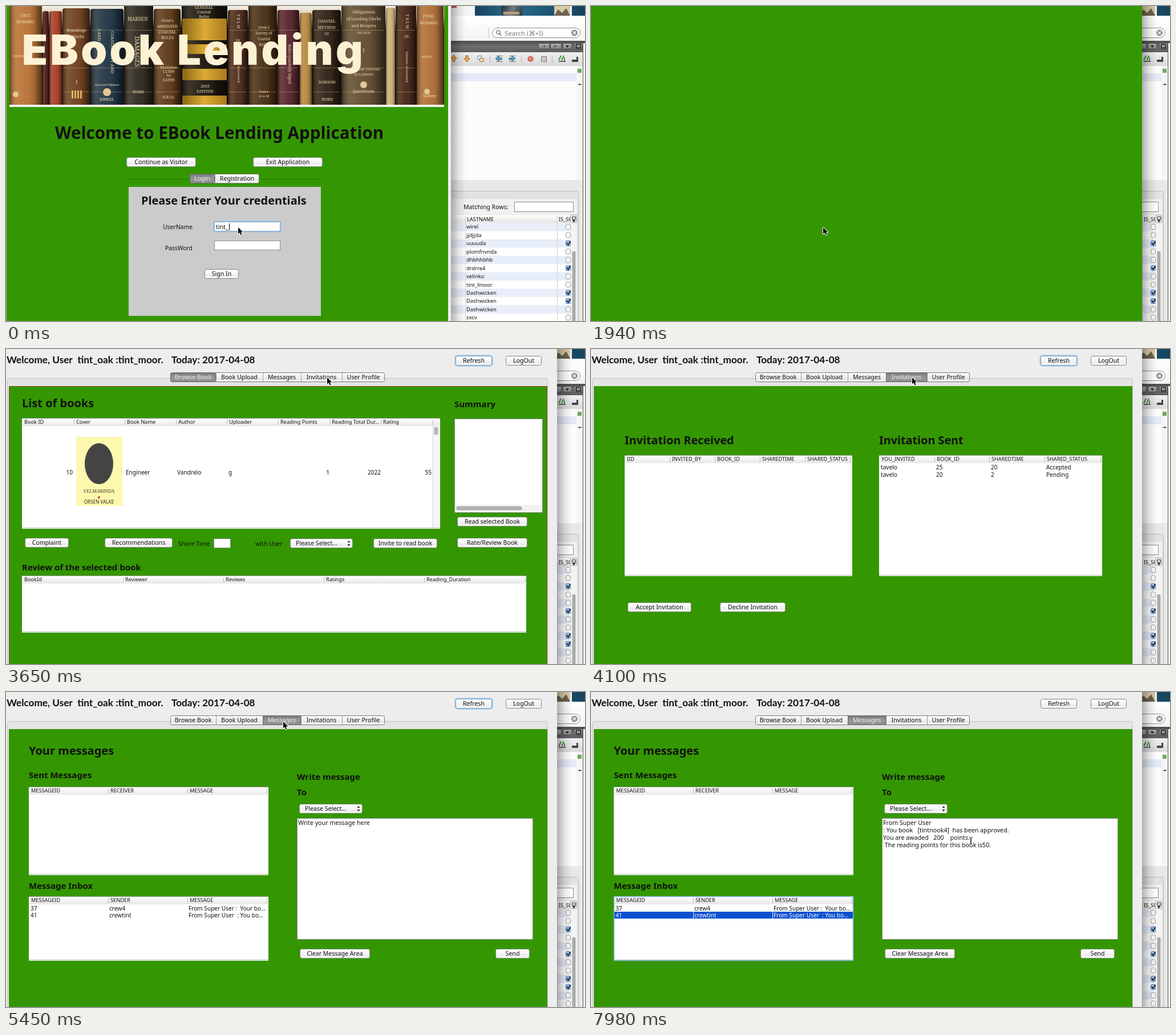
Write an HTML page with a canvas that moves like this. It is 1015 px wide and 552 px high and loops after 8000 ms.

```html
<!DOCTYPE html>
<html lang="en">
<head>
<meta charset="utf-8">
<title>EBook Lending</title>
<style>
html, body { margin: 0; width: 100%; height: 100%; overflow: hidden; background: #349702; }
canvas { display: block; }
</style>
</head>
<body>
<canvas id="stage" width="1015" height="552"></canvas>
<script>
const g = document.getElementById('stage').getContext('2d');
const LOOP = 8000, GREEN = '#349702', INK = '#111';
const SANS = '"Noto Sans", "Open Sans", sans-serif';

// ---------- helpers ----------
function rect(x, y, w, h, fill) { g.fillStyle = fill; g.fillRect(x, y, w, h); }

function fade(x0, y0, x1, y1, ...colors) {
  const gr = g.createLinearGradient(x0, y0, x1, y1);
  colors.forEach((c, i) => gr.addColorStop(i / (colors.length - 1), c));
  return gr;
}

function round(x, y, w, h, r, fill, stroke, lw = 1) {
  g.beginPath();
  g.roundRect(x + .5, y + .5, w - 1, h - 1, r);
  if (fill) { g.fillStyle = fill; g.fill(); }
  if (stroke) { g.strokeStyle = stroke; g.lineWidth = lw; g.stroke(); }
}

function disc(x, y, r, fill) {
  g.beginPath(); g.arc(x, y, r, 0, 7); g.fillStyle = fill; g.fill();
}

function poly(points, fill, stroke, lw = 1) {
  g.beginPath();
  for (let i = 0; i < points.length; i += 2) g.lineTo(points[i], points[i + 1]);
  if (fill) { g.closePath(); g.fillStyle = fill; g.fill(); }
  if (stroke) { g.strokeStyle = stroke; g.lineWidth = lw; g.stroke(); }
}

// y is the middle of the capitals
function text(s, x, y, size = 10.6, o = {}) {
  g.font = `${o.weight || 400} ${size}px ${o.font || SANS}`;
  g.textAlign = o.align || 'left';
  g.fillStyle = o.color || INK;
  g.fillText(s, x, y + size * .357);
}

const heading = (s, x, y, size = 15) => text(s, x, y, size, { weight: 700 });

function focusRing(x, y, w, h, r) {
  round(x - 1, y - 1, w + 2, h + 2, r + 1, null, '#92c2ee', 2);
}

function button(s, x, y, w, h = 17, focus) {
  round(x, y, w, h, 3, fade(0, y, 0, y + h, '#fff', '#fbfbfb', '#ececec', '#fafafa'), '#7d8a76');
  if (focus) focusRing(x, y, w, h, 3);
  text(s, x + w / 2, y + h / 2, 10.6, { align: 'center' });
}

function field(x, y, w, h, focus) {
  rect(x, y, w, h, '#fff');
  g.lineWidth = 1; g.strokeStyle = '#8c8c8c';
  g.strokeRect(x + .5, y + .5, w - 1, h - 1);
  if (focus) focusRing(x, y, w, h, 1);
}

function popup(x, y, w) {
  button('', x, y, w);
  text('Please Select...', x + 10, y + 8.5);
  const cx = x + w - 7;
  poly([cx - 2.5, y + 7, cx + 2.5, y + 7, cx, y + 3.5], '#333');
  poly([cx - 2.5, y + 10, cx + 2.5, y + 10, cx, y + 13.5], '#333');
}

function segments(labels, edges, y, active) {
  const x = edges[0], w = edges.at(-1) - x, h = 17;
  round(x, y, w, h, 3, fade(0, y, 0, y + h, '#fff', '#f4f4f4', '#e8e8e8', '#fafafa'), '#777');
  labels.forEach((s, i) => {
    const a = edges[i], b = edges[i + 1];
    if (i === active) round(a, y, b - a, h, i ? 0 : 3, fade(0, y, 0, y + h, '#777', '#969696', '#8a8a8a'), '#666');
    else if (i) rect(a, y + 1, 1, h - 2, '#9a9a9a');
    text(s, (a + b) / 2, y + 8.5, 10.6, { align: 'center', color: i === active ? '#eee' : INK });
  });
}

function table(x, y, w, h, heads, edges) {
  rect(x, y, w, h, '#fff');
  rect(x, y, w, 1, '#9b9b9b');
  rect(x, y + h - 2, w, 1, '#aebaa6');
  rect(x + 1, y + 1, w - 2, 13, fade(0, y, 0, y + 14, '#fff', '#f5f5f5', '#e6e6e6'));
  heads.forEach((s, i) => {
    text(s, edges[i] + 4, y + 7, 9.2);
    rect(edges[i + 1], y + 3, 1, 9, '#b5b5b5');
  });
}

function cells(row, xs, y, color) {
  row.forEach((s, i) => text(s, xs[i], y, 10.1, { color }));
}

// ---------- window behind ----------
const PEOPLE = ['wirel', 'jjdjjda', 'uuuuda', 'plomfnvnda', 'dhbhhbhb', 'drdrre4', 'velinko',
  'tint_lmoor', 'Dashwicken', 'Dashwicken', 'Dashwicken', 'zxcv'];
const TICKED = [2, 5, 8, 9];

function ide() {
  rect(775, 0, 240, 552, '#e8e8e8');
  // picture strip
  rect(775, 0, 47, 17, '#f4f4f4');
  rect(781, 0, 9, 3, '#c8453a');
  rect(822, 0, 193, 17, fade(822, 0, 1015, 0, '#17435c', '#2b6d8c', '#1d5674', '#17435c'));
  rect(868, 0, 37, 17, fade(868, 0, 905, 17, '#1c2b36', '#6d7d82', '#27323a'));
  rect(872, 10, 28, 5, '#b39a76');
  rect(961, 0, 28, 17, '#d8c9a8');
  poly([961, 17, 968, 6, 975, 12, 982, 4, 989, 17], '#6b6350');
  rect(989, 0, 3, 17, '#f4f4f4');
  rect(775, 17, 240, 45, fade(0, 17, 0, 62, '#fff', '#f4f4f4'));
  // search
  rect(846, 38, 1, 19, '#c4c4c4');
  round(852, 38, 155, 18, 9, '#fff', '#8f8f8f');
  g.beginPath(); g.arc(863, 46, 3.2, 0, 7); g.strokeStyle = '#666'; g.lineWidth = 1.2; g.stroke();
  poly([865, 48.5, 868, 52], null, '#666', 1.4);
  text('Search (⌘+I)', 874, 47.5, 11.4, { color: '#777' });
  disc(996.5, 47, 5.5, '#8e8e8e');
  poly([994, 44.5, 999, 49.5], null, '#fff', 1.4);
  poly([999, 44.5, 994, 49.5], null, '#fff', 1.4);
  // dark bar
  rect(775, 61, 240, 20, fade(0, 61, 0, 81, '#4c4c4c', '#6e6e6e', '#5d5d5d'));
  [[933, 20], [954, 20], [976, 16], [996, 15]].forEach(([x, w]) =>
    round(x, 65, w, 11, 1, fade(0, 65, 0, 76, '#b4b4b4', '#7c7c7c'), '#474747'));
  poly([941, 70.5, 945, 68, 945, 73], '#555');
  poly([965, 70.5, 961, 68, 961, 73], '#555');
  poly([981, 69, 987, 69, 984, 73], '#222');
  g.strokeStyle = '#111'; g.lineWidth = 1.4; g.strokeRect(999.5, 67.5, 8, 6);
  // tools
  rect(775, 81, 240, 24, fade(0, 81, 0, 105, '#f0f0f0', '#d9d9d9'));
  const arrow = (x, d) => poly([x - 5, 92, x, 92 - 6 * d, x + 5, 92, x + 2, 92, x + 2, 92 + 5 * d, x - 2, 92 + 5 * d, x - 2, 92], '#f0a848', '#8b5c20');
  arrow(785, 1); arrow(808, -1);
  round(826, 87, 8, 7, 1, '#e6eefa', '#4a78a8');
  round(830, 91, 8, 7, 1, '#f4d9a0', '#8b7740');
  [[864, -1], [887, 1]].forEach(([x, d]) => {
    for (const y of [87, 97]) rect(x - 5, y, 12, 1, '#777');
    poly([x + 6 * d, 92, x, 88, x, 91, x - 5 * d, 91, x - 5 * d, 94, x, 94, x, 97], '#5aa0c8', '#276184');
  });
  for (const x of [848, 903, 957]) rect(x, 86, 1, 14, '#b2b2b2');
  disc(919.5, 92.5, 5, '#c84b3f'); disc(919.5, 92, 3.6, '#e8877b');
  round(938, 88, 10, 10, 0, '#c9c9c9', '#777');
  rect(969, 96, 12, 2, '#666'); rect(978, 90, 2, 7, '#777');
  poly([969, 95, 973, 87], null, '#35942f', 2);
  poly([974, 95, 978, 87], null, '#35942f', 2);
  rect(992, 94, 11, 4, '#444'); rect(1000, 89, 3, 6, '#444');
  // editor
  rect(775, 105, 236, 200, '#fcfcfc');
  rect(775, 118, 225, 14, '#e3e9f6');
  rect(1000, 105, 11, 200, '#f5f5f5');
  rect(1002, 110, 7, 7, '#67ad58');
  rect(1002, 137, 7, 1, '#555'); rect(1005, 136, 2, 3, '#555');
  // results
  round(760, 324, 244, 260, 3, '#e2e2e2', '#bababa');
  rect(775, 338, 226, 27, '#f1f1f1');
  text('Matching Rows:', 802, 352);
  field(891, 343, 104, 18);
  rect(775, 366, 226, 14, fade(0, 366, 0, 380, '#fff', '#e6e6e6'));
  text('LASTNAME', 808, 373.5, 9.2);
  text('IS_SU', 969, 373.5, 9.2);
  PEOPLE.forEach((name, i) => {
    const y = 380 + i * 14.45;
    rect(775, y, 216, 14.5, i % 2 ? '#fff' : '#e8eef9');
    text(name, 807, y + 7, 9.4);
    const on = TICKED.includes(i);
    round(981, y + 2, 9, 10, 2, on ? '#9fc8f2' : '#fafafa', on ? '#4672a8' : '#9a9a9a');
    if (on) poly([983, y + 6, 985.5, y + 9.5, 989.5, y + 3], null, '#111', 1.7);
  });
  for (const x of [805, 966]) rect(x, 367, 1, 185, '#cfcfcf');
  rect(990, 380, 11, 172, '#f3f3f3');
  round(992, 429, 7, 140, 3.5, '#aaa');
  round(989, 366, 12, 14, 1, '#f6f6f6', '#999');
  g.strokeStyle = '#222'; g.strokeRect(992.5, 369.5, 6, 4);
  poly([992, 375, 999, 375, 995.5, 379], '#222');
  rect(1011, 65, 1, 487, '#555');
  rect(1012, 65, 3, 487, '#f5f5f5');
}

function shadow(x) {
  rect(x, 0, 26, 552, fade(x, 0, x + 26, 0, 'rgba(0,0,0,.3)', 'rgba(0,0,0,.1)', 'rgba(0,0,0,0)'));
}

// ---------- login ----------
// left, width, colour, top
const SPINES = [
  [6, 58, '#b8743a', 0], [64, 12, '#4b1f1a', 9], [76, 23, '#a8402c', 9], [99, 49, '#6e4021', 4],
  [148, 59, '#203546', 5], [207, 52, '#2e2a23', 0], [259, 48, '#5e3a1c', 5], [308, 81, '#1c1610', 0],
  [389, 36, '#4b2b1b', 7], [425, 51, '#493019', 0], [476, 39, '#572530', 7], [515, 22, '#b78a44', 12],
  [537, 51, '#2e2117', 7], [588, 78, '#614d34', 0], [666, 17, '#cdb27c', 3], [683, 37, '#47261a', 0],
  [720, 48, '#b0703a', 0]
];

function lines(list, x, y, size, step = size * 1.25) {
  list.forEach((s, i) => text(s, x, y + i * step, size,
    { align: 'center', color: '#f0dfb5', font: '"Noto Serif", serif' }));
}

function upright(s, x, y, size) {
  g.save(); g.translate(x, y); g.rotate(Math.PI / 2);
  lines([s], 0, 0, size);
  g.restore();
}

function banner() {
  rect(6, 0, 762, 176, fade(0, 0, 0, 40, '#f6f1e6', '#cbbfa8', '#1c130d'));
  SPINES.forEach(([x, w, c, top], i) => {
    g.beginPath();
    g.roundRect(x, top, w - 1, 173 - top, top ? [4, 4, 0, 0] : 0);
    for (const fill of [c, fade(x, 0, x + w, 0, 'rgba(0,0,0,.45)', 'rgba(255,235,190,.12)',
      'rgba(255,235,190,.04)', 'rgba(0,0,0,.12)', 'rgba(0,0,0,.6)')]) {
      g.fillStyle = fill; g.fill();
    }
    if (w > 30 && i && i !== 7 && i < 16)
      for (const y of [42, 108, 150]) rect(x + 2, y, w - 5, 1, 'rgba(235,205,140,.35)');
  });
  for (const [y, h] of [[22, 38], [67, 17], [110, 20], [157, 16]])
    rect(309, y, 78, h, fade(309, 0, 387, 0, '#8a6517', '#dcab35', '#a87a1d'));
  rect(6, 173, 762, 4, '#f3f1e6');

  lines(['FIRST', 'REMARKS'], 34, 17, 6.5, 11);
  lines(['ORVEN'], 22, 88, 6);
  lines(['Brandings', '& Marks'], 123, 43, 7, 11);
  lines(['1'], 124, 134, 8);
  for (let i = 0; i < 4; i++) rect(115 + i * 5, 148, 3, 14, '#d9b25c');
  upright('COASTAL DUTY AND', 187, 81, 7.5);
  upright('LAND CLAIMS', 164, 66, 7.5);
  lines(['Second Edition'], 177, 138, 6);
  lines(['BIRKEL'], 177, 164, 7);
  lines(['MARDEN'], 231, 23, 8);
  upright('DAMAGES', 230, 80, 11);
  lines(['NORD'], 232, 151, 7);
  lines(["Orne's", 'ABRIDGED', 'COASTAL', 'RULES'], 283, 26, 7, 10);
  lines(['Sections', '12300', 'to', '14599'], 285, 107, 7.5, 7.3);
  lines(['N.R.Co.'], 285, 160, 6.5);
  lines(['GENERAL', 'Coastal', 'Rules'], 347, 3, 7, 8);
  lines(['2005', 'EDITION'], 349, 141, 7, 9);
  upright('T R L M', 407, 27, 7);
  lines(['28'], 406, 61, 7);
  upright('Statutes Annotated', 408, 107, 6);
  lines(["Orne's", 'Survey of', 'Coastal', 'Rules'], 452, 38, 6.5, 10);
  lines(['Index', 'A to M'], 452, 150, 6, 8);
  upright('Rules Quarterly Digest', 497, 102, 6.5);
  lines(['COASTAL', 'METHOD', '10'], 562, 27, 7, 11);
  lines(['DORWIN'], 563, 134, 7);
  lines(['NORD'], 563, 164, 7);
  lines(['Obligations', 'of Lending Clerks', 'and Keepers'], 627, 10, 7.3, 12);
  lines(['VELDEN'], 627, 47, 6);
  lines(['1'], 627, 78, 8);
  lines(['RULES AND CUSTOMS', 'OF LENDING'], 627, 111, 5.5, 9);
  lines(['QuireNorm'], 627, 150, 7);
  upright('T R L M', 703, 27, 7);
  lines(['29'], 702, 54, 7);
  upright('Statutes Annotated', 703, 107, 6);
  lines(['FINAL', 'REMARKS'], 741, 18, 6.5, 12);
  lines(['ROWE'], 738, 89, 6);
  lines(['Tolliver'], 743, 158, 6.5);
  for (const [x, y, r] of [[17, 155, 5], [177, 151, 7], [627, 138, 6], [738, 150, 5]]) disc(x, y, r, '#e2c795');

  g.letterSpacing = '4.5px';
  text('EBook Lending', 28, 76.5, 73.5, { weight: 900, font: 'Inter, "Open Sans", sans-serif', color: '#fdf1d3' });
  g.letterSpacing = '0px';
}

function login(t) {
  rect(0, 0, 775, 552, GREEN);
  rect(0, 0, 1, 552, '#9fc78c');
  rect(775, 0, 5, 552, '#ededed');
  shadow(780);
  banner();
  heading('Welcome to EBook Lending Application', 86, 222, 29.6);
  button('Continue as Visitor', 211, 265, 122);
  button('Exit Application', 433, 265, 122);
  rect(215, 303, 338, 1, '#2a7a05');
  segments(['Login', 'Registration'], [322, 366, 444], 294, 0);
  rect(215, 317, 337, 226, '#cbcbcb');
  heading('Please Enter Your credentials', 237, 341, 19.9);
  text('UserName', 327, 387, 10.4, { align: 'right' });
  text('PassWord', 327, 424, 10.4, { align: 'right' });

  const inName = t < 750;
  const step = (from) => Math.max(0, Math.min(3, Math.floor((t - from) / 150) + 1));
  const name = 'tint_oak'.slice(0, 5 + step(150));
  field(365, 378, 116, 17, inName);
  field(365, 411, 116, 17, !inName);
  text(name, 368, 387);
  let caret = 369 + g.measureText(name).width;
  if (!inName) {
    const dots = step(1200);
    for (let i = 0; i < dots; i++) disc(371.5 + i * 6.5, 420, 2.5, INK);
    caret = 368 + dots * 6.6;
  }
  rect(Math.round(caret), inName ? 381 : 413, 1, 12, '#000');
  button('Sign In', 348, 461, 60);
}

// ---------- main window ----------
const TABS = ['Browse Book', 'Book Upload', 'Messages', 'Invitations', 'User Profile'];

function frame(tab, refreshFocus) {
  rect(0, 0, 966, 552, '#ededed');
  const o = { weight: 700, font: 'Lato, sans-serif' };
  text('Welcome, User  tint_oak :tint_moor.', 1, 19, 17.2, o);
  text('Today: 2017-04-08', 290, 19, 17.2, o);
  button('Refresh', 788, 12, 64, 17, refreshFocus);
  button('LogOut', 876, 12, 63);
  round(2, 51, 948, 520, 4, '#e4e4e4', '#c2c2c2');
  segments(TABS, [288, 368, 450, 517, 589, 664], 41, tab);
  rect(5, 65, 944, 487, GREEN);
}

function cover() {
  rect(123, 154, 81, 121, '#fdf8ae');
  g.beginPath(); g.ellipse(163, 201, 25, 36, 0, 0, 7);
  g.fillStyle = '#444'; g.fill();
  text('VELMARINDA', 163, 249, 8.2, { align: 'center', font: '"Liberation Serif", serif', color: '#332a1c' });
  disc(163, 260, 2, '#b5402a');
  text('ORSEN VALKE', 163, 268.5, 8.2, { align: 'center', color: '#332a1c' });
}

function browse(ready) {
  frame(0, ready);
  g.strokeStyle = '#8f4a12'; g.lineWidth = 1;
  g.strokeRect(5.5, 65.5, 943, 500);
  heading('List of books', 28, 95, 20);
  heading('Summary', 786, 97);
  table(28, 121, 733, 194,
    ['Book ID', 'Cover', 'Book Name', 'Author', 'Uploader', 'Reading Points', 'Reading Total Dur...', 'Rating'],
    [28, 119, 208, 298, 387, 477, 567, 657, 748]);
  rect(748, 135, 1, 178, '#d0d0d0');
  rect(749, 135, 11, 178, '#f6f6f6');
  round(750, 136, 8, 15, 4, '#b5b5b5');
  cover();
  cells(['Engineer', 'Vandrelo', 'g'], [210, 300, 390], 216);
  [['10', 117], ['1', 567], ['2022', 657], ['55', 746]].forEach(([s, x]) =>
    text(s, x, 216, 10.1, { align: 'right' }));
  field(786, 122, 155, 165);
  rect(787, 273, 153, 12, '#f2f2f2');
  round(789, 275, 116, 8, 4, '#b0b0b0');
  button('Read selected Book', 791, 294, 123);
  button('Rate/Review Book', 791, 331, 123);
  button('Complaint', 33, 331, 77);
  button('Recommendations', 173, 331, 119);
  text('Share Time', 302, 341);
  field(364, 332, 30, 17);
  text('with User', 437, 341);
  popup(498, 332, 110);
  button('Invite to read book', 644, 332, 112);
  heading('Review of the selected book', 28, 383);
  table(28, 397, 884, 100, ['BookId', 'Reviewer', 'Reviews', 'Ratings', 'Reading_Duration'],
    [28, 205, 381, 557, 733, 910]);
}

function invitations() {
  frame(3, true);
  heading('Invitation Received', 59, 160, 19.8);
  heading('Invitation Sent', 505, 160, 19.8);
  table(59, 186, 399, 212, ['IID', 'INVITED_BY', 'BOOK_ID', 'SHAREDTIME', 'SHARED_STATUS'],
    [59, 138, 217, 296, 375, 454]);
  table(505, 186, 391, 212, ['YOU_INVITED', 'BOOK_ID', 'SHAREDTIME', 'SHARED_STATUS'],
    [505, 602, 698, 795, 893]);
  const xs = [508, 605, 701, 798];
  cells(['tavelo', '25', '20', 'Accepted'], xs, 207);
  cells(['tavelo', '20', '2', 'Pending'], xs, 220);
  button('Accept Invitation', 64, 444, 112);
  button('Decline Invitation', 226, 444, 115);
}

function messages(open) {
  frame(2, !open);
  heading('Your messages', 40, 103, 20);
  heading('Sent Messages', 40, 146);
  heading('Message Inbox', 40, 340);
  heading('Write message', 510, 149);
  heading('To', 510, 176);
  const edges = [40, 179, 318, 457];
  table(40, 166, 420, 155, ['MESSAGEID', 'RECEIVER', 'MESSAGE'], edges);
  table(40, 358, 420, 113, ['MESSAGEID', 'SENDER', 'MESSAGE'], edges);
  if (open) {
    round(40, 358, 420, 113, 0, null, '#8dbbe8', 1.5);
    rect(41, 385, 418, 12, '#0b50d0');
    for (const x of [179, 318]) rect(x, 385, 1, 12, '#dfe8f8');
  }
  const xs = [43, 181, 320];
  cells(['37', 'crew4', 'From Super User :  Your bo...'], xs, 379);
  cells(['41', 'crewtint', 'From Super User  : You bo...'], xs, 391.5, open ? '#fff' : INK);
  popup(514, 196, 111);
  field(510, 221, 414, 213);
  const body = open
    ? ['From Super User', ': You book   [tintnook4]  has been approved.',
       'You are awaded   200    points.', ' The reading points for this book is50.']
    : ['Write your message here'];
  body.forEach((s, i) => text(s, 512, 229.5 + i * 12.8, 10.7));
  button('Clear Message Area', 515, 450, 123);
  button('Send', 858, 450, 60);
}

// ---------- pointer ----------
// start time, step length, then the points visited
const PATHS = [
  [0, 1, [[407, 388]]],
  [2560, 156, [[416, 366], [452, 296], [520, 200], [592, 118], [629, 74], [598, 58], [563, 53]]],
  [3650, 1, [[563, 50]]],
  [4700, 150, [[547, 52], [517, 52], [495, 52], [486, 52]]],
  [6050, 146, [[470, 88], [418, 175], [350, 284], [290, 376], [256, 426], [232, 405], [224, 389]]],
  [7680, 150, [[398, 318], [606, 234], [666, 261]]]
];

function pointer(t) {
  const [from, step, points] = PATHS.findLast(p => t >= p[0]);
  const [x, y] = points[Math.min(points.length - 1, Math.floor((t - from) / step))];
  if (t >= 7680 && x > 510) {
    for (const [c, w] of [['#fff', 2.6], ['#111', 1]]) {
      poly([x - 3, y - 7, x, y - 5, x, y + 5, x - 3, y + 7], null, c, w);
      poly([x + 3, y - 7, x, y - 5, x, y + 5, x + 3, y + 7], null, c, w);
    }
    return;
  }
  g.save();
  g.translate(x, y);
  g.lineJoin = 'round';
  const shape = [0, 0, 0, 11.5, 2.7, 9, 4.7, 13.4, 6.6, 12.5, 4.7, 8.4, 8.2, 8.2];
  poly([...shape, 0, 0], null, '#fff', 2);
  poly(shape, '#000');
  g.restore();
}

// ---------- timeline ----------
function draw(t) {
  ide();
  if (t < 1940) login(t);
  else {
    shadow(966);
    if (t < 2090) rect(0, 0, 966, 552, GREEN);
    else if (t < 4100) browse(t >= 2270);
    else if (t < 5450) invitations();
    else messages(t >= 7230);
  }
  pointer(t);
}

const start = performance.now();
function tick() {
  draw((performance.now() - start) % LOOP);
  requestAnimationFrame(tick);
}
tick();
</script>
</body>
</html>
```
